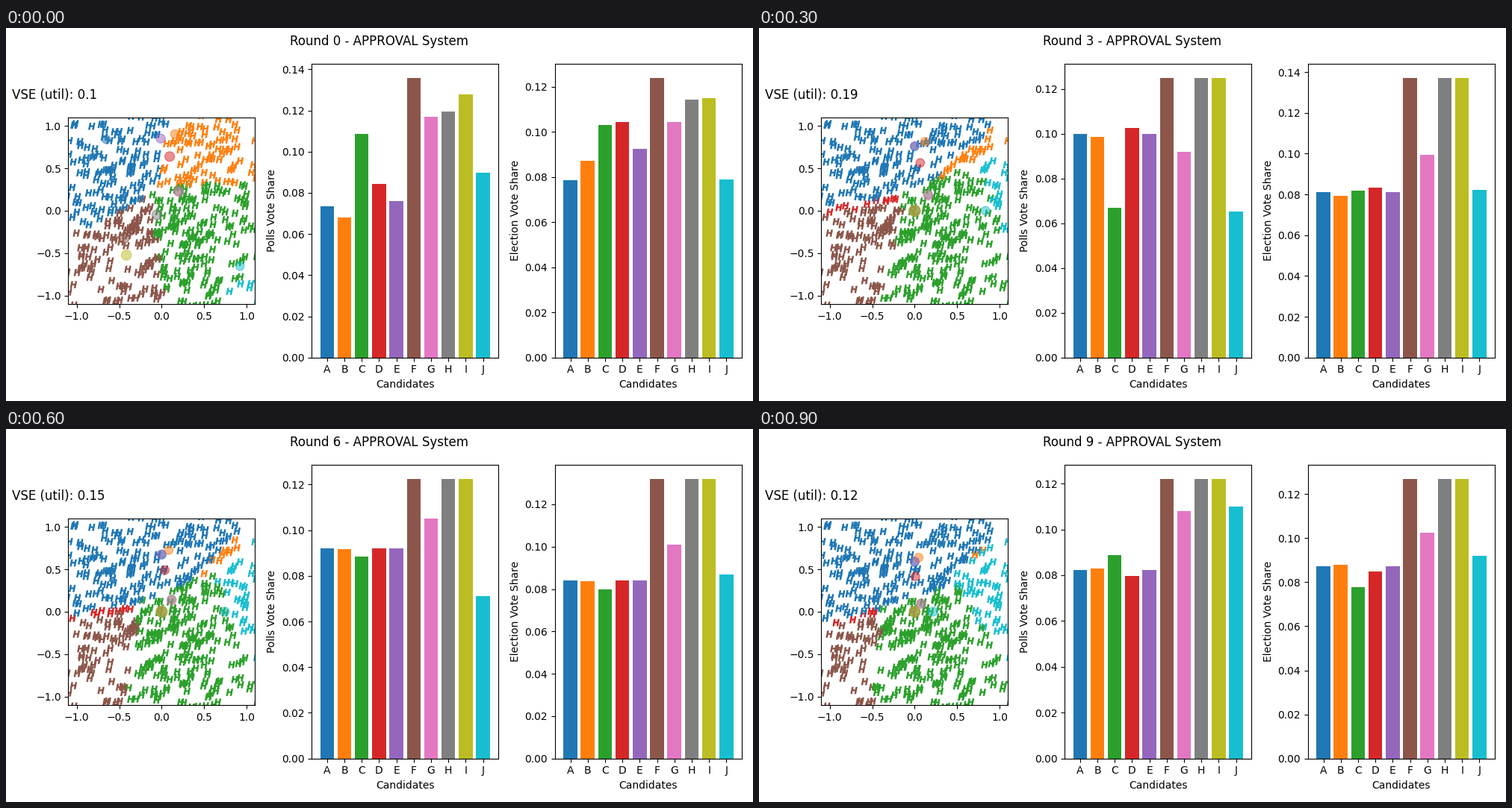
These frames come from a looping animation (1000 by 500 pixels, 1000 ms). A matplotlib script:

```python
import numpy as np
import matplotlib.pyplot as plt
from matplotlib.animation import FuncAnimation

ROUNDS = 10
NAMES = list("ABCDEFGHIJ")
COLORS = [f"C{k}" for k in range(10)]
BLUE, ORANGE, GREEN, RED, BROWN, CYAN = 0, 1, 2, 3, 5, 9
VSE = [0.1, 0.2, 0.19, 0.19, 0.17, 0.16, 0.15, 0.15, 0.14, 0.12]

# Where the candidates start.
START = np.array([
    (-.654, .841), (.156, .902), (.2, .235), (.094, .638), (-.011, .85),
    (-.443, -.32), (.2, .224), (-.055, -.048), (-.416, -.524), (.922, -.656)])

rng = np.random.default_rng(12)
voters = rng.normal(0, 1, (880, 2))
voters = voters[(np.abs(voters) < 1.16).all(axis=1)]


def line_up(a, b, c, d, g, j):
    """Shares of all ten: A and E tie, and F, H and I split the remainder."""
    lead = (1 - 2 * a - b - c - d - g - j) / 3
    return np.array([a, b, c, d, a, lead, g, lead, lead, j])


FIRST_POLL = np.array([27, 25, 40, 31, 28, 50, 43, 44, 47, 33]) / 368
FIRST_VOTE = np.array([.0784, .0872, .103, .1043, .0925,
                       .1239, .1043, .1141, .1148, .079])
EARLY_VOTE = line_up(.0789, .0767, .0834, .083, .0983, .0789)
LATE_VOTE = line_up(.0872, .0878, .0778, .0848, .1026, .0919)


def votes(r):
    if r == 0:
        return FIRST_VOTE
    return EARLY_VOTE + (LATE_VOTE - EARLY_VOTE) * (r - 1) / (ROUNDS - 2)


def polls(r):
    """The vote plus a swing shared by candidates of the same camp."""
    if r == 0:
        return FIRST_POLL

    def swing(*keys):
        return np.interp(r, [1, 2, 3, 5, 7, 9], keys) / 1000

    rear = swing(20, 1, 19, 5, 11, -5)
    mid = swing(-11, -11, -15, 18, -1, 11)
    far = swing(7, 17, -17, -9, -23, 18)
    a, b, c, d, _, _, g, _, _, j = votes(r)
    return line_up(a + rear, b + rear, c + mid, d + rear, g + mid / 2, j + far)


def candidates(r):
    """After the opening everyone stays in the upper right and nears the origin."""
    if r == 0:
        return START
    base = np.maximum(START, 0)
    pos = np.maximum(base - 0.031 * np.sqrt(base) * r, 0)
    if r == ROUNDS - 1:
        pos[-1, 0] = .215  # J's final leap
    return pos


def favourites(r):
    """Split the voter map along straight borders that glide with the rounds."""
    x, y = voters.T
    if r == 0:
        top = y > np.minimum(.31, .25 + .5 * x)
        areas = [(top & (x > -.07 + .16 * y), ORANGE),
                 (top, BLUE),
                 (x < -.1 - .13 * y, BROWN),
                 (y < 1.09 * x - 1.8, CYAN)]
    else:
        t = (r - 1) / (ROUNDS - 2)
        top = y > np.maximum(.3 - .12 * t + .4 * x, .28 - .17 * t + .2 * x)
        left = x < -.08 - .3 * t + (.27 - .17 * t) * y
        right = x > 1.05 - .37 * t - (.24 + .34 * t) * y
        areas = [(right & (y < .345 - .21 * t + (.33 + .38 * t) * x), CYAN),
                 (top & (y < .195 - .285 * t + (.907 + .173 * t) * x), ORANGE),
                 (top, BLUE),
                 (left & (y > .14 - .09 * t + (.14 + .07 * t) * x), RED),
                 (left, BROWN)]
    tests, picks = zip(*areas)
    return np.select(tests, picks, GREEN)


def draw_map(ax, r):
    ax.clear()
    ax.scatter(*voters.T, s=36, marker="$H$",
               c=[COLORS[k] for k in favourites(r)])
    ax.scatter(*candidates(r).T, s=820 * votes(r), c=COLORS, alpha=0.5, zorder=2)
    ticks = np.arange(-1, 1.1, 0.5)
    ax.set(xlim=(-1.1, 1.1), ylim=(-1.1, 1.1), xticks=ticks, yticks=ticks,
           aspect="equal")
    ax.text(-0.3, 1.1, f"VSE (util): {VSE[r]}", fontsize=12,
            transform=ax.transAxes)


def draw_bars(ax, shares, label):
    ax.clear()
    ax.bar(NAMES, shares, color=COLORS)
    ax.set(xlabel="Candidates", ylabel=label)


def update(r):
    title.set_text(f"Round {r} - APPROVAL System")
    # Start from the same margins each time so the layout depends only on r.
    fig.subplots_adjust(left=.125, right=.9, bottom=.11, top=.88, wspace=.2)
    draw_map(ax_map, r)
    draw_bars(ax_polls, polls(r), "Polls Vote Share")
    draw_bars(ax_votes, votes(r), "Election Vote Share")
    fig.tight_layout()
    return []


plt.rcParams["font.family"] = "DejaVu Sans"
fig, (ax_map, ax_polls, ax_votes) = plt.subplots(1, 3, figsize=(10, 5), dpi=100)
title = fig.suptitle("", y=0.982, fontsize=12)

anim = FuncAnimation(fig, update, frames=ROUNDS, interval=100, repeat=True)
plt.show()
```
